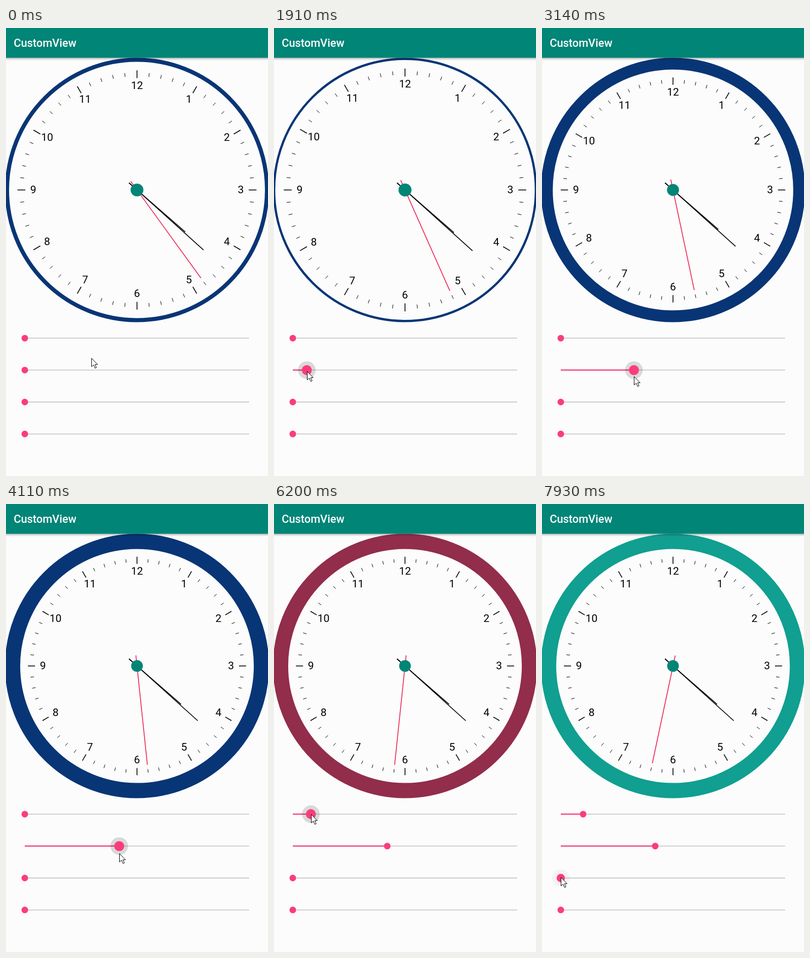
Recreate the animation shown at these times as an HTML page. Size 516x881 px, loop 8000 ms.

```html
<!DOCTYPE html>
<html lang="en">
<head>
<meta charset="utf-8">
<title>CustomView</title>
<style>
  html, body { margin: 0; width: 100%; height: 100%; overflow: hidden; background: #fcfcfc; }
  svg { display: block; width: 516px; height: 881px; font-family: Roboto, sans-serif; }
</style>
</head>
<body>
<svg viewBox="0 0 516 881">
  <defs>
    <linearGradient id="shade" x1="0" y1="0" x2="0" y2="1">
      <stop offset="0" stop-color="#000" stop-opacity=".3"/>
      <stop offset=".45" stop-color="#000" stop-opacity=".14"/>
      <stop offset="1" stop-color="#000" stop-opacity="0"/>
    </linearGradient>
  </defs>
  <g id="clock"></g>
  <rect y="58" width="516" height="6" fill="url(#shade)"/>
  <rect width="516" height="58.5" fill="#008577"/>
  <text x="15.2" y="36.5" font-size="21.8" font-weight="500" fill="#fff">CustomView</text>
  <g id="sliders"></g>
  <path id="cursor" d="M0 0V16.5L4 13L7 19.5L9.6 18.3L6.8 12.2H11.8Z" fill="#fff" stroke="#000"/>
</svg>
<script>
const LOOP = 8000, STEP = 135;
const CX = 258, CY = 318.5, OUTER = 260, LEFT = 37, RIGHT = 479;
const PINK = '#fa3c7e';

// spans in which the screen refreshes about every STEP ms; it holds still between them
const bursts = [
  [120, 820], [1250, 2180], [2300, 3260], [3380, 3800], [4110, 4110],
  [4420, 5380], [5530, 5650], [6080, 6200], [6510, 6780], [7080, 7930]
];

// pointer path: time, x, y
const path = [
  [0, 168, 649], [820, 37, 672], [1250, 42, 673], [1910, 64.5, 674.5], [2180, 73, 675],
  [3140, 183, 685], [3300, 183, 685], [3800, 223, 687], [4400, 223, 687], [5020, 50, 610],
  [5380, 50, 610], [5650, 72, 610], [6480, 73, 610], [6780, 81, 611], [6950, 81, 611], [7750, 37, 734]
];

// when the pointer holds each slider
const holds = [{ down: 5020, up: 6950 }, { down: 1130, up: 4300 }, { down: 7780, up: LOOP }, null];

// the first slider picks the ring colour
const colors = ['#083575', '#ad4c08', '#922d4c', '#109f90'];
const colorStops = [45, 56, 73.5];

const clamp = (v, a, b) => Math.min(b, Math.max(a, v));

function refreshTime(t) {
  const now = t + 16;
  const burst = bursts.filter(b => b[0] <= now).pop();
  if (!burst) return 0;
  const [a, b] = burst, n = Math.round((b - a) / STEP);
  if (!n) return a;
  const step = (b - a) / n;
  return a + step * Math.min(n, Math.floor((now - a) / step));
}

function pointerAt(t) {
  const i = path.findIndex(p => p[0] > t);
  if (i < 0) return path[path.length - 1].slice(1);
  const [ta, xa, ya] = path[i - 1], [tb, xb, yb] = path[i];
  const k = (t - ta) / (tb - ta);
  return [xa + (xb - xa) * k, ya + (yb - ya) * k];
}

// thumb place and press strength of a slider
function sliderAt(hold, t) {
  if (!hold || t < hold.down) return { x: LEFT, press: 0 };
  return {
    x: pointerAt(Math.min(t, hold.up))[0],
    press: clamp((t - hold.down) / 300, 0, 1) * (1 - clamp((t - hold.up) / 250, 0, 1))
  };
}

const $ = id => document.getElementById(id);
function set(el, attrs) {
  for (const k in attrs) el.setAttribute(k, attrs[k]);
  return el;
}
function add(parent, tag, attrs) {
  return parent.appendChild(set(document.createElementNS('http://www.w3.org/2000/svg', tag), attrs));
}
function ray(el, deg, from, to) {
  const a = deg * Math.PI / 180, s = Math.sin(a), c = Math.cos(a);
  set(el, { x1: CX + s * from, y1: CY - c * from, x2: CX + s * to, y2: CY - c * to });
}

const clock = $('clock');
const ring = add(clock, 'circle', { cx: CX, cy: CY, fill: 'none' });
const marks = [], numbers = [];
for (let i = 0; i < 60; i++)
  marks.push(add(clock, 'line', { stroke: '#000', 'stroke-width': i % 5 ? 1 : 1.6 }));
for (let i = 1; i <= 12; i++) {
  const n = add(clock, 'text', { 'font-size': 21, 'text-anchor': 'middle' });
  n.textContent = i;
  numbers.push(n);
}
const hand = color => add(clock, 'line', { stroke: color, 'stroke-width': 1.6 });
const hourHand = hand('#000'), minuteHand = hand('#000'), secondHand = hand('#ee2150');
const hub = add(clock, 'circle', { cx: CX, cy: CY, fill: '#008577' });

const sliders = holds.map((hold, i) => {
  const g = $('sliders'), y = 609.9 + 62.8 * i;
  const bar = (color, x2) => add(g, 'line', { x1: LEFT, x2, y1: y, y2: y, stroke: color, 'stroke-width': 2.3 });
  const dot = color => add(g, 'circle', { cx: LEFT, cy: y, r: 17.3, fill: color });
  bar('#d4d4d4', RIGHT);
  return { hold, fill: bar(PINK, LEFT), halo: dot('#000'), thumb: dot(PINK) };
});

function drawClock(t, width, color) {
  const r = OUTER - width;
  set(ring, { r: OUTER - width / 2, 'stroke-width': width, stroke: color });
  marks.forEach((m, i) => ray(m, i * 6, r * (i % 5 ? .887 : .873), r * (i % 5 ? .917 : .934)));
  numbers.forEach((n, i) => {
    const a = (i + 1) * Math.PI / 6, d = r * .873 - 15.6;
    set(n, { x: CX + Math.sin(a) * d, y: CY - Math.cos(a) * d + 6 });
  });
  const seconds = 24 + Math.floor((t + 960) / 1000);
  ray(hourHand, 131, -21, r * .5);
  ray(minuteHand, 132, -21, r * .7);
  ray(secondHand, seconds * 6, -21, r * .85);
  hub.setAttribute('r', r * .05);
}

function draw(now) {
  const t = refreshTime(now % LOOP);
  const states = sliders.map(s => {
    const { x, press } = sliderAt(s.hold, t);
    set(s.fill, { x2: x });
    set(s.halo, { cx: x, opacity: .14 * press * press });
    set(s.thumb, { cx: x, r: 6.5 + 3.3 * press });
    return x;
  });
  const moved = states[1] - LEFT;
  const color = colors[colorStops.filter(v => v < states[0]).length];
  drawClock(t, moved ? moved * .161 : 8, color);
  const [x, y] = pointerAt(t).map(v => Math.round(v) + .5);
  set($('cursor'), { transform: `translate(${x} ${y})` });
}

const start = performance.now();
function loop() {
  draw(performance.now() - start);
  requestAnimationFrame(loop);
}
loop();
</script>
</body>
</html>
```
